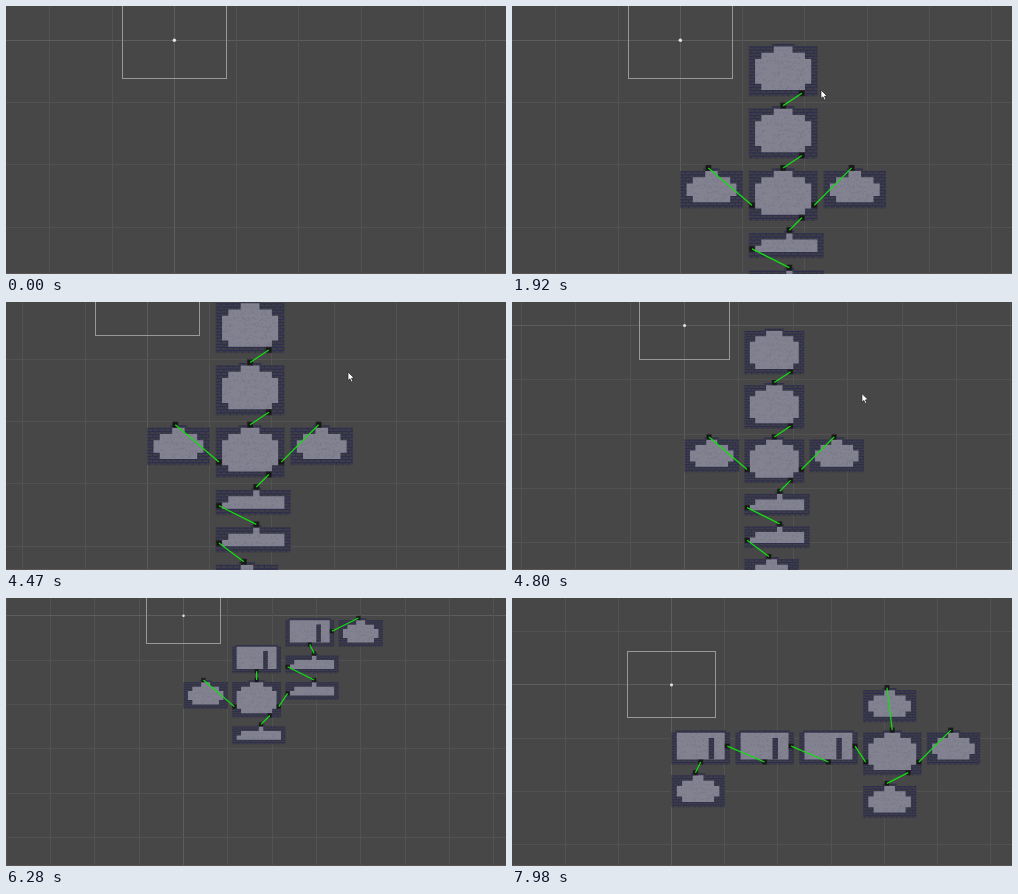
Animation of 500x268 px, one loop 8 s. Source, as an HTML page with a canvas:

```html
<!DOCTYPE html>
<html lang="en">
<head>
<meta charset="utf-8">
<title>Dungeon generator</title>
<style>
html, body { margin: 0; width: 100%; height: 100%; overflow: hidden; background: #474747; }
canvas { display: block; }
</style>
</head>
<body>
<canvas id="stage" width="500" height="268"></canvas>
<script>
const W = 500, H = 268, LOOP = 8000;
const ctx = document.getElementById('stage').getContext('2d');

// Room kinds in tiles: wall thickness per floor row on the left and right, and doors by side.
// The last door also serves the sides that have none.
const KINDS = {
  big: { w: 11, left: '4211112', doors: { n: [5, -1], e: [10, 5], w: [0, 5], s: [8, 7] } },
  dome: { w: 10, left: '42112', doors: { n: [4, -1] } },
  flat: { w: 12, left: '621', right: '511', doors: { n: [6, -1], w: [0, 2] } },
  hall: { w: 11, left: '11111', pillar: [7, 1, 1, 4], doors: { e: [10, 2], s: [5, 5] } }
};
const OPPOSITE = { n: 's', s: 'n', e: 'w', w: 'e' };

for (const kind of Object.values(KINDS)) {
  const right = kind.right || kind.left;
  kind.floor = [...kind.left].map((l, row) => [+l, row, kind.w - l - right[row], 1]);
  kind.h = kind.floor.length + 1;
}

function door({ kind, x, y }, side) {
  const [dx, dy] = kind.doors[side] || Object.values(kind.doors).pop();
  return [x + dx, y + dy];
}

// Grows a dungeon from one room; "0s big" hangs a big room on the south side of room 0.
function grow(start, first, x, y, steps) {
  const rooms = [{ kind: KINDS[first], x, y }], links = [];
  for (const step of steps.split(', ')) {
    const from = rooms[step[0]], side = step[1], kind = KINDS[step.slice(3)];
    const room = { kind, x: from.x, y: from.y };
    if (side === 'e') room.x += from.kind.w + 1;
    if (side === 'w') room.x -= kind.w + 1;
    if (side === 's') room.y += from.kind.h + 2;
    if (side === 'n') room.y -= kind.h + 2;
    rooms.push(room);
    links.push([door(from, side), door(room, OPPOSITE[side])]);
  }
  return { start, rooms, links };
}

const DUNGEONS = [
  grow(1670, 'big', 11, 1, '0s big, 1s big, 2w dome, 2e dome, 2s flat, 5s flat, 6s dome'),
  grow(5810, 'big', 11, 15, '0w dome, 0e flat, 2n flat, 3n hall, 4e dome, 0s dome'),
  grow(6200, 'big', 11, 15, '0w dome, 0e flat, 2n flat, 3n hall, 4e dome, 0s flat, 0n hall'),
  grow(6420, 'hall', 0, 9, '0e hall, 1e big, 2n dome, 2s dome, 2e dome'),
  grow(7740, 'hall', 0, 9, '0e hall, 1e hall, 2e big, 3n dome, 3e dome, 3s dome, 0s dome')
];

// time, origin x, origin y, grid spacing
const VIEW = [
  [3400, 168.35, 34.2, 62.3], [3950, 141.3, -5, 62.3],
  [4520, 141.3, -5, 62.3], [5130, 212.2, 59.6, 44.3],
  [5220, 212.2, 59.6, 44.3], [5480, 177.5, 17.8, 44.3],
  [6570, 177.5, 17.8, 44.3], [7350, 159.5, 86.9, 53.2]
];

// time, x, y; beyond x = 500 the pointer is off the stage
const POINTER = [
  [590, 342, -12], [820, 438, 34], [821, 510, 107],
  [960, 510, 107], [1010, 491, 107], [1060, 510, 108],
  [1270, 510, 108], [1350, 491, 110], [1440, 510, 112],
  [1690, 510, 112], [1920, 309, 84], [2310, 285, 100], [2700, 242, 130],
  [3070, 265, 106], [3400, 265, 106], [3950, 238, 67], [4400, 342, 70],
  [4520, 342, 70], [5130, 360, 119], [5220, 360, 119], [5480, 326, 77],
  [5640, 510, 110], [6570, 510, 110], [6720, 400, 150],
  [7350, 270, 238], [7580, 409, 116], [7660, 510, 112]
];
const GRABS = [[3150, 3950], [5220, 5480], [6720, 7350]];

const ARROW = [[0, 0], [0, 8.5], [2, 6.8], [3.3, 10], [4.8, 9.4], [3.5, 6.3], [6, 6]];
const HAND = [[-4, 4], [-2.6, 1], [0, 0], [2.6, 1], [3.8, 2.4], [3.8, 7], [2.5, 10], [-1.5, 10]];

function track(keys, t) {
  const i = keys.findIndex(k => k[0] > t);
  const b = keys.at(i), a = keys[i - 1] || b;
  if (i < 1) return b.slice(1);
  const u = (t - a[0]) / (b[0] - a[0]), e = u * u * (3 - 2 * u);
  return a.slice(1).map((v, j) => v + (b[j + 1] - v) * e);
}

function rect(color, x, y, w, h) {
  ctx.fillStyle = color;
  ctx.fillRect(x, y, w, h);
}

function dot(x, y, r, color) {
  ctx.beginPath();
  ctx.arc(x, y, r, 0, 7);
  ctx.fillStyle = color;
  ctx.fill();
}

function noise(n) {
  const v = Math.sin(n * 127.1) * 43758.5453;
  return v - Math.floor(v);
}

function drawPointer(points, x, y) {
  ctx.beginPath();
  points.forEach(([px, py]) => ctx.lineTo(x + px, y + py));
  ctx.closePath();
  ctx.fillStyle = '#fff';
  ctx.strokeStyle = '#222';
  ctx.lineWidth = 0.7;
  ctx.fill();
  ctx.stroke();
}

function drawGrid(ox, oy, step) {
  const color = n => n ? '#525252' : '#5d5d5d';
  for (let n = -6; n < 12; n++) {
    rect(color(n), Math.floor(ox + n * step), 0, 1, H);
    rect(color(n), 0, Math.floor(oy + n * step), W, 1);
  }
}

function drawWall(x, y, w, h) {
  rect('#3e3e47', x, y, w, h);
  for (let r = 0; r < h * 2; r++) {
    rect('#2f2f4d', x, y + r / 2, w, 0.2);
    for (let c = r % 2 ? 0.25 : 0.75; c < w; c++) rect('#2f2f4d', x + c, y + r / 2, 0.15, 0.5);
  }
}

function drawRoom({ kind, x, y }) {
  ctx.save();
  ctx.translate(x, y);
  const [left, , span] = kind.floor[0];
  drawWall(left - 0.3, -0.4, span + 0.6, 0.5);
  drawWall(0, 0, kind.w, kind.h);
  ctx.beginPath();
  kind.floor.forEach(row => ctx.rect(...row));
  ctx.fillStyle = '#828291';
  ctx.fill();
  kind.floor.forEach(([fx, fy, w]) => {
    for (let i = 0; i < w * 4; i++) {
      const n = fy * 53 + i;
      rect('#797989', fx + noise(n) * (w - 0.2), fy + noise(n + 0.5) * 0.8, 0.2, 0.2);
    }
  });
  if (kind.pillar) drawWall(...kind.pillar);
  ctx.restore();
}

function drawDungeon({ rooms, links }, tile) {
  rooms.forEach(drawRoom);
  links.flat().forEach(([x, y]) => {
    rect('#2a2a2a', x, y, 1, 1);
    rect('#161616', x + 0.12, y + 0.12, 0.76, 0.76);
  });
  ctx.beginPath();
  links.forEach(([a, b]) => {
    ctx.moveTo(a[0] + 0.5, a[1] + 0.5);
    ctx.lineTo(b[0] + 0.5, b[1] + 0.5);
  });
  ctx.strokeStyle = '#14dc14';
  ctx.lineWidth = 1.25 / tile;
  ctx.stroke();
}

function drawSelection(ox, oy, tile) {
  const x = ox + 10.85 * tile, y = oy + 11.15 * tile, w = 6 * tile, h = 7 * tile;
  ctx.strokeStyle = '#9a9aa8';
  ctx.lineWidth = 0.8;
  ctx.strokeRect(x, y, w, h);
  for (const cx of [x, x + w]) for (const cy of [y, y + h]) {
    dot(cx, cy, 2.4, '#20488c');
    dot(cx, cy, 1.6, '#5b9cf0');
  }
  dot(x + w / 2, y + h / 2, 3.6, '#2c66b8');
  dot(x + w / 2, y + h / 2, 1.7, '#5c86bd');
}

function drawCamera(ox, oy, step) {
  const x = Math.floor(ox - step * 0.835), y = Math.floor(oy - step * 0.622);
  const right = Math.floor(ox + step * 0.835), bottom = Math.floor(oy + step * 0.622);
  ctx.strokeStyle = '#989898';
  ctx.lineWidth = 1;
  ctx.strokeRect(x + 0.5, y + 0.5, right - x, bottom - y);
  dot(ox, oy, step / 36, '#e4e4e4');
}

function draw(t) {
  const [ox, oy, step] = track(VIEW, t), tile = step / 10;
  rect('#474747', 0, 0, W, H);
  drawGrid(ox, oy, step);
  rect('#5a5656', 0, H - 1, W, 1);

  const dungeon = DUNGEONS.filter(d => d.start <= t).pop();
  if (dungeon) {
    ctx.save();
    ctx.translate(ox, oy);
    ctx.scale(tile, tile);
    drawDungeon(dungeon, tile);
    ctx.restore();
  }
  drawCamera(ox, oy, step);
  if (t >= 2700 && t < 3700) drawSelection(ox, oy, tile);

  const grabbing = GRABS.some(([from, to]) => t >= from && t < to);
  drawPointer(grabbing ? HAND : ARROW, ...track(POINTER, t));
}

function tick() {
  draw(performance.now() % LOOP);
  requestAnimationFrame(tick);
}
tick();
</script>
</body>
</html>
```
